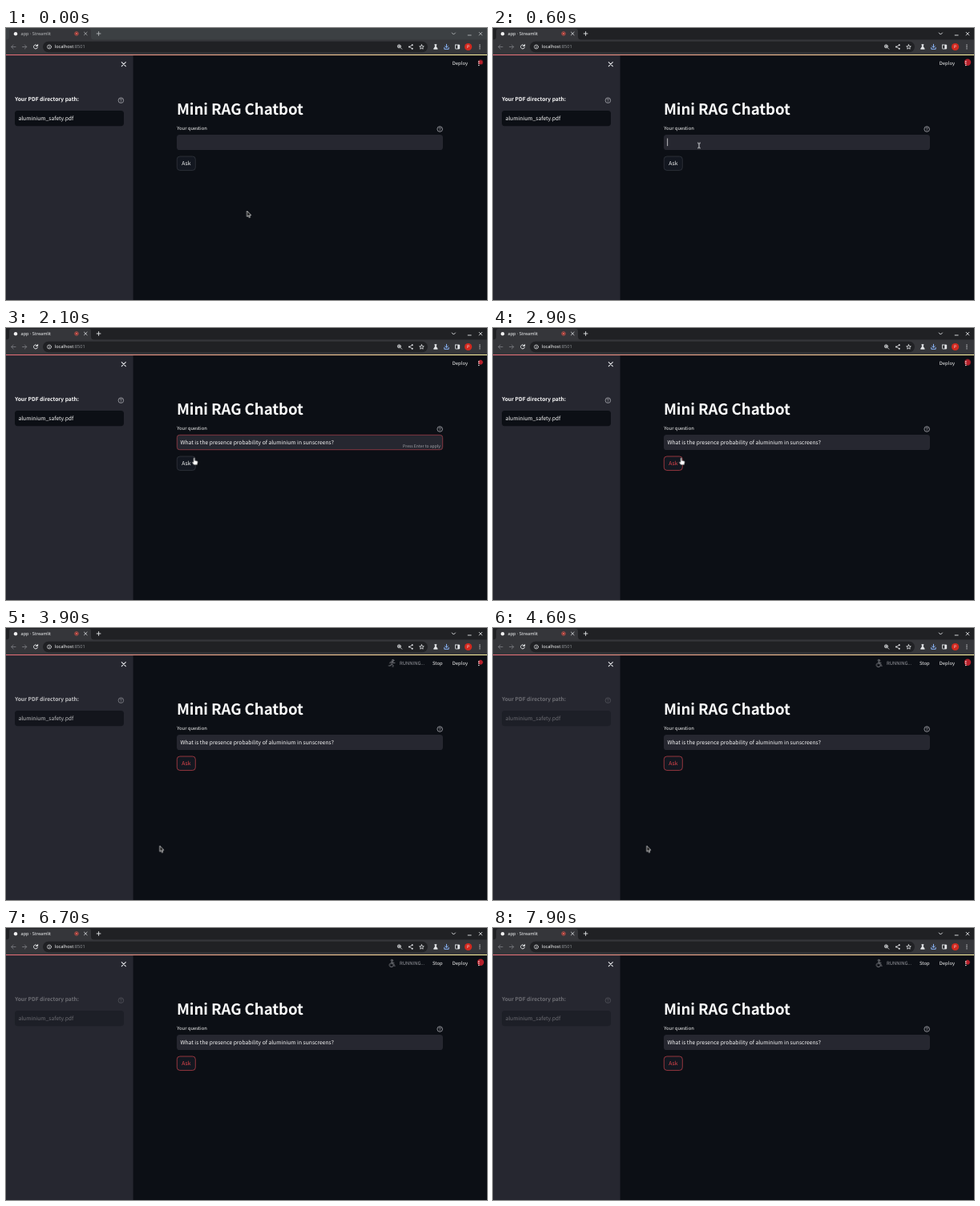
Animation, 600 px wide and 339 px high, one loop 8000 ms. Source, as an HTML page:

```html
<!DOCTYPE html>
<html>
<head>
<meta charset="utf-8">
<title>Chatbot demo</title>
<style>
  html, body { margin: 0; width: 100%; height: 100%; overflow: hidden; background: #0c0f15; }
  svg { display: block; width: 100vw; height: 100vh; }
  text {
    font: 6.74px "Noto Sans CJK JP", "Noto Sans CJK SC", "Noto Sans CJK", "Noto Sans", sans-serif;
    fill: #fafafa; text-rendering: geometricPrecision; white-space: pre;
  }
  .chrome { font: 5.6px "Noto Sans", "Open Sans", sans-serif; fill: #f1f3f4; }
  .small { font-size: 5.88px; }
  .hint { font-size: 5.08px; fill: #a3a4aa; }
  .bold { font-size: 6.66px; font-weight: 700; }
  .title { font-size: 18.7px; font-weight: 700; letter-spacing: -.1px; }
  .line { fill: none; stroke: #e8eaed; stroke-linecap: round; stroke-linejoin: round; }
  .dim { stroke: #77797d; }

  /* One shared 8 s clock; each part has its own track. */
  .a { animation: 8s infinite step-end; }
  .frame { animation-name: frame; }
  .focus { animation-name: focus; }
  .pointer { animation-name: move; animation-timing-function: ease-in-out; }
  .arrow { animation-name: arrow; }
  .beam { animation-name: beam; }
  .hand { animation-name: hand; }
  .caret { animation-name: caret; }
  .query { animation-name: query; }
  .edge { animation-name: edge; }
  .press { animation-name: press; }
  .run { animation-name: run; }
  .stale { animation-name: stale; animation-timing-function: linear; }
  .ask rect { animation-name: askEdge; animation-timing-function: linear; }
  .ask text { animation-name: askText; animation-timing-function: linear; }
  .pulse { animation: pulse 2s ease-in-out infinite; transform-origin: 592px 42.7px; }
  .pose { opacity: 0; animation: pose 1.6s step-end infinite; animation-delay: calc(var(--i) * .2s - 1.6s); }

  @keyframes frame { 0% { fill: #3c4043 } 5.6%, 100% { fill: #202124 } }
  @keyframes focus { 0% { opacity: .7 } 5.6%, 100% { opacity: 1 } }
  @keyframes move {
    0%, 1.25% { transform: translate(300.6px, 228px); opacity: 1 }
    6.25%, 23.125% { transform: translate(257px, 146.5px) }
    25.625%, 45.625% { transform: translate(234.7px, 161.8px) }
    48.125%, 74.99% { transform: translate(191.8px, 271.5px); opacity: 1 }
    75%, 100% { transform: translate(191.8px, 271.5px); opacity: 0 }
  }
  @keyframes arrow { 0% { opacity: 1 } 5% { opacity: 0 } 24% { opacity: 1 } 25% { opacity: 0 } 46.25%, 100% { opacity: 1 } }
  @keyframes beam { 0% { opacity: 0 } 5% { opacity: 1 } 24%, 100% { opacity: 0 } }
  @keyframes hand { 0% { opacity: 0 } 25% { opacity: 1 } 46.25%, 100% { opacity: 0 } }
  @keyframes caret {
    0% { opacity: 0 } 6.25% { opacity: 1 } 12.5% { opacity: 0 }
    15% { opacity: 1; transform: translateX(192.2px) }
    21.25%, 100% { opacity: 0 }
  }
  @keyframes query { 0% { opacity: 0 } 15%, 100% { opacity: 1 } }
  @keyframes edge { 0% { opacity: 0 } 8.1% { opacity: 1 } 35%, 100% { opacity: 0 } }
  @keyframes press { 0% { opacity: 0 } 15% { opacity: 1 } 35%, 100% { opacity: 0 } }
  @keyframes run { 0% { opacity: 0 } 37.5%, 100% { opacity: 1 } }
  @keyframes stale { 0%, 43.75% { opacity: 1 } 56.25%, 100% { opacity: .33 } }
  @keyframes askEdge { 0%, 26.5% { stroke: #33363e } 29%, 100% { stroke: #b83f48 } }
  @keyframes askText { 0%, 26.5% { fill: #fafafa } 29%, 100% { fill: #e8474d } }
  @keyframes pulse { 0%, 5% { transform: scale(.68) } 30%, 37% { transform: scale(1) } 60%, 100% { transform: scale(.68) } }
  @keyframes pose { 0% { opacity: 1 } 12.5%, 100% { opacity: 0 } }
</style>
</head>
<body>
<svg viewBox="0 0 600 339" preserveAspectRatio="none">
  <defs>
    <linearGradient id="strip">
      <stop offset="0" stop-color="#dd6a74"/><stop offset=".5" stop-color="#f2b08c"/><stop offset="1" stop-color="#f4ec9c"/>
    </linearGradient>
    <g id="help">
      <circle r="3.3" fill="none" stroke="#a9aab0" stroke-width=".8"/>
      <path class="line" d="M-1.1-.8A1.1 1.1 0 1 1 .5 0Q0 .3 0 .8M0 1.8V1.9" style="stroke:#a9aab0;stroke-width:.7"/>
    </g>
    <g id="cross"><path class="line" d="M-1.8-1.8 1.8 1.8M1.8-1.8-1.8 1.8"/></g>
    <g id="stand">
      <circle cy="-3.4" r="1.1"/>
      <path d="M-3.6-1.7H3.6M0-1.7V1M-.8-1V4.3M.8-1V4.3"/>
    </g>
    <g id="sprint">
      <circle cx="1.2" cy="-3.6" r="1.1"/>
      <path d="M.6-1.9-.5 1 1.4 2.4 1 4.4M-.5 1-1.8 3-4 3M.6-1.9-1.8-1.6-2.6 0M.6-1.9 1.8-.2 3.4-.6"/>
    </g>
    <g id="stride">
      <circle cx=".8" cy="-3.6" r="1.1"/>
      <path d="M.3-1.9 0 1 2.2 4.3M0 1-2.2 4.3M.3-1.9-1.8.2M.3-1.9 2.4.1"/>
    </g>
    <g id="wheel">
      <circle cx="-.2" cy="-3.7" r="1"/>
      <path d="M-.2-2.3V.8H2.2L3.3 3.7M-.2-1 2.2-.8M-1.5-.2A2.5 2.5 0 1 0 1.8 2.6"/>
    </g>
    <g id="bike">
      <circle cx="1.2" cy="-3.7" r="1"/>
      <path d="M3-1.2 1.2-1.6-.9-.6.6 1V3"/>
      <circle cx="-2.5" cy="2.6" r="1.6" fill="none"/><circle cx="2.6" cy="2.6" r="1.6" fill="none"/>
    </g>
  </defs>

  <!-- Browser -->
  <rect class="a frame" width="600" height="34"/>
  <path d="M0 14.5Q4 14.5 4 11V4Q4 .8 7.5.8H102.5Q106 .8 106 4V11Q106 14.5 110 14.5H600V33H0Z" fill="#35363a"/>
  <circle cx="12" cy="7.3" r="2.2" fill="#f2f2f2"/>
  <g class="a focus">
    <text class="chrome" x="18.6" y="9" style="font-size:5.5px">app · Streamlit</text>
    <use href="#cross" x="99.3" y="7" stroke-width=".8"/>
    <path class="line" d="M113.2 7H118M115.6 4.6V9.4" stroke-width=".9"/>
    <path class="line" d="M556.3 6 558.4 8.1 560.5 6M576.2 9H580.2" stroke-width=".9"/>
    <use href="#cross" x="592" y="7.2" stroke-width=".9"/>
  </g>
  <circle cx="88" cy="7" r="2.3" fill="none" stroke="#d9534b" stroke-width=".8"/>
  <circle cx="88" cy="7" r="1.3" fill="#e8584f"/>

  <path class="line dim" d="M12 23.5H6.8M9.2 21 6.7 23.5 9.2 26M20.5 23.5H25.7M23.3 21 25.8 23.5 23.3 26" stroke-width=".9"/>
  <path class="line" d="M39.2 22.1A2.5 2.5 0 1 0 39.4 24.3M39.6 20.6V22.5H37.6" stroke-width="1"/>
  <rect x="46" y="16.7" width="480" height="13.6" rx="6.8" fill="#202124"/>
  <circle class="line" cx="54" cy="23.5" r="2.5" stroke-width=".7"/>
  <path class="line" d="M54 23.3V24.8M54 22.1V22.2" stroke-width=".7"/>
  <text class="chrome" x="60.7" y="25.4">localhost<tspan fill="#8d9095">:8501</tspan></text>
  <g class="line" stroke-width=".8">
    <circle cx="490.4" cy="22.8" r="2"/><path d="M492 24.4 493.8 26.2M489.5 22.8H491.3M490.4 21.9V23.7"/>
    <path d="M506.5 21.4 503.2 23.5 506.5 25.6"/>
    <path d="M518.5 20.8 519.3 22.7 521.3 22.9 519.8 24.2 520.2 26.2 518.5 25.1 516.8 26.2 517.2 24.2 515.7 22.9 517.7 22.7Z"/>
    <path d="M534.7 20.8H537.1M535.3 21V23.2L533.5 26.2H538.3L536.5 23.2V21Z" fill="#e8eaed"/>
    <path d="M549.5 20.3V24.1M547.8 22.6 549.5 24.3 551.2 22.6M546.8 24.4V26.3H552.2V24.4" stroke="#8ab4f8" stroke-width="1"/>
    <rect x="560.5" y="21" width="5.2" height="5" rx=".4"/>
  </g>
  <rect x="563.4" y="21" width="2.4" height="5" fill="#e8eaed"/>
  <g fill="#e8eaed">
    <circle cx="506.8" cy="21.3" r="1"/><circle cx="503" cy="23.5" r="1"/><circle cx="506.8" cy="25.7" r="1"/>
    <circle cx="591" cy="21.2" r=".65"/><circle cx="591" cy="23.5" r=".65"/><circle cx="591" cy="25.8" r=".65"/>
  </g>
  <circle cx="576.6" cy="23.5" r="4.6" fill="#d3291f"/>
  <text class="chrome" x="576.6" y="25.3" text-anchor="middle" style="font-size:5px">P</text>

  <!-- Page -->
  <rect y="33" width="600" height="306" fill="#0c0f15"/>
  <rect y="33" width="158.6" height="306" fill="#262730"/>
  <rect y="33" width="600" height="1.1" fill="url(#strip)"/>

  <g transform="translate(146.8 45.2) scale(1.4)"><use href="#cross" stroke-width=".75"/></g>
  <g class="a stale">
    <text class="bold" x="11.2" y="91.3">Your PDF directory path:</text>
    <use href="#help" x="143.4" y="90.2"/>
    <rect x="11" y="103" width="136" height="19.2" rx="3.6" fill="#0c0f15"/>
    <text x="15.4" y="115">aluminium_safety.pdf</text>
  </g>

  <text class="title" x="213" y="107.6">Mini RAG Chatbot</text>
  <text class="small" x="213.2" y="127.3">Your question</text>
  <use href="#help" x="541.2" y="126"/>
  <rect x="213" y="133" width="332" height="19" rx="3.6" fill="#262730"/>
  <rect class="a edge" x="213.3" y="133.3" width="331.4" height="18.4" rx="3.4" fill="none" stroke="#a83c45" stroke-width=".7"/>
  <text class="a query" x="217.6" y="144.9">What is the presence probability of aluminium in sunscreens?</text>
  <text class="a press hint" x="542" y="149.3" text-anchor="end">Press Enter to apply</text>
  <rect class="a caret" x="217.4" y="137.5" width=".7" height="9.6" fill="#fafafa"/>

  <g class="ask">
    <rect class="a" x="213.3" y="160" width="23" height="17.4" rx="3.6" fill="#131720" stroke="#33363e" stroke-width=".8"/>
    <text class="a" x="224.8" y="171" text-anchor="middle">Ask</text>
  </g>

  <!-- Header status -->
  <g class="a run">
    <g transform="translate(481.5 44)" fill="#85868c" stroke="#85868c" stroke-width=".9" stroke-linecap="round" stroke-linejoin="round">
      <g fill="none">
        <use class="pose" href="#bike" style="--i:0"/>
        <use class="pose" href="#wheel" style="--i:1"/>
        <use class="pose" href="#stand" style="--i:2"/>
        <use class="pose" href="#sprint" style="--i:3"/>
        <use class="pose" href="#stride" style="--i:4"/>
        <use class="pose" href="#bike" style="--i:5"/>
        <use class="pose" href="#stand" style="--i:6"/>
        <use class="pose" href="#wheel" style="--i:7"/>
      </g>
    </g>
    <text class="small" x="491" y="46" style="fill:#9b9ca2">RUNNING...</text>
    <text class="small" x="532" y="46">Stop</text>
  </g>
  <text class="small" x="556.8" y="46">Deploy</text>
  <circle class="pulse" cx="592" cy="42.7" r="4.2" fill="#b5202b"/>
  <g fill="#fafafa">
    <circle cx="589.8" cy="41.8" r=".75"/><circle cx="589.8" cy="44.1" r=".75"/><circle cx="589.8" cy="46.4" r=".75"/>
  </g>

  <!-- Pointer -->
  <g class="a pointer">
    <path class="a arrow" d="M0 0V7.2L1.6 5.8 2.7 8.3 3.9 7.8 2.8 5.3H5Z" fill="#111" stroke="#fff" stroke-width=".7"/>
    <path class="a beam line" d="M-1.6-3.2Q0-3.2 0-2.4Q0-3.2 1.6-3.2M0-2.4V2.6M-1.6 3.4Q0 3.4 0 2.6Q0 3.4 1.6 3.4" stroke-width=".9"/>
    <path class="a hand" d="M-.9.3Q0-.6.8.3V3.3L3.8 4Q4.6 4.3 4.5 5.3L3.8 8.8H-.4L-2.8 5.6Q-2.6 4.4-.9 5.4Z" fill="#fff" stroke="#111" stroke-width=".4"/>
  </g>
</svg>
</body>
</html>
```
